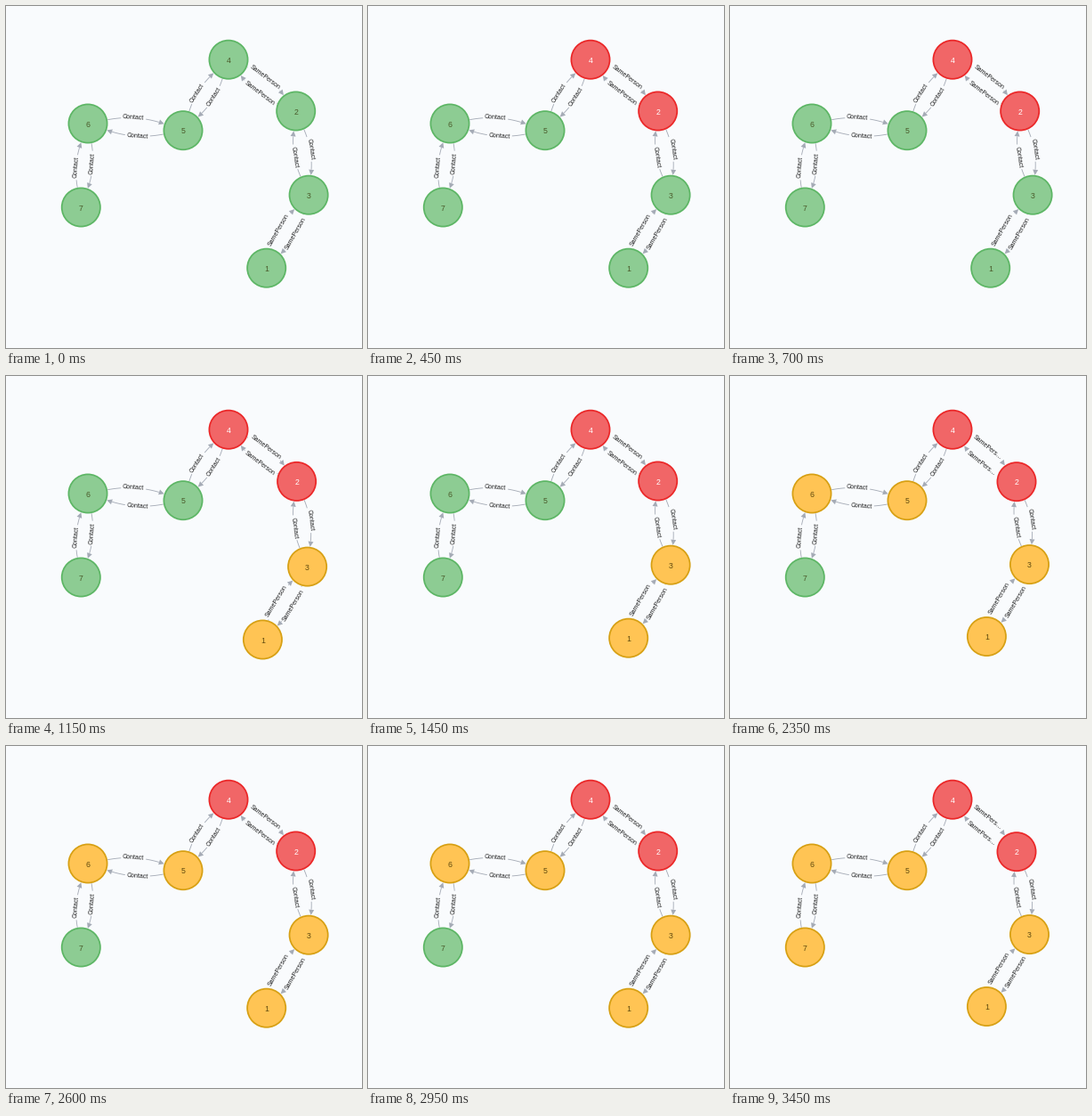
Animation, 400 px wide and 384 px high, one loop 3550 ms. Source, as a matplotlib script:

```python
import matplotlib.pyplot as plt
import numpy as np
from matplotlib.animation import FuncAnimation
from matplotlib.patches import Circle, Polygon

W, H, DPI = 400, 384, 100
LOOP, TICK = 3550, 50
STEP_MS = 82.56            # the layout refreshes at about 12 steps a second
PT = 72 / DPI              # points per pixel

RADIUS, RING = 21.6, 1.75
EDGE_RADIUS = 22.5
DEFLECTION = np.radians(15)
HEAD = 6.0
GREY = "#A5ABB6"
FONT = "Liberation Sans"

GREEN = ("#8DCC93", "#5DB665", "#4A5A2A")
RED = ("#F16667", "#EB2728", "#FFFFFF")
YELLOW = ("#FFC454", "#D7A013", "#604A0E")

HOME = {1: (292.7, 294.2), 2: (325.7, 118), 3: (340.1, 212.2), 4: (250, 60.2),
        5: (199, 139.7), 6: (92, 132), 7: (84.3, 226)}
LINKS = [(4, 2, "SamePerson"), (3, 1, "SamePerson"), (2, 3, "Contact"),
         (5, 4, "Contact"), (6, 5, "Contact"), (6, 7, "Contact")]
LABEL_WIDTH = {"Contact": 24.1, "SamePerson": 40.5, "SamePers…": 39.7}

# Step at which each node takes its new colour.
RECOLOUR = {4: (1, RED), 2: (1, RED), 3: (14, YELLOW), 1: (14, YELLOW),
            5: (28, YELLOW), 6: (28, YELLOW), 7: (42, YELLOW)}

# Offsets of the swinging nodes 2, 3 and 1.
REST = ((0, 0), (0, 0), (0, 0))
DIP = ((0.9, 0.4), (-1.5, 1.9), (-4.3, 1.8))
LEFT = ((-3.7, 0.7), (-3.6, -0.6), (-4.3, -1.7))
RIGHT = ((2, 0), (4.4, 0.8), (4.2, 2.8))
SWING = [(0, REST), (1, DIP), (2, LEFT), (5, REST), (11, REST), (13, RIGHT),
         (14, DIP), (15, LEFT), (18, REST), (25, REST), (27, RIGHT),
         (28, DIP), (29, LEFT), (32, REST), (39, REST), (41, RIGHT), (42, LEFT)]
SWING_STEPS = [step for step, _ in SWING]
SWING_POSES = np.array([pose for _, pose in SWING], float)

STEP_TICKS = np.floor(np.arange(43) * STEP_MS / TICK)

fig = plt.figure(figsize=(W / DPI, H / DPI), dpi=DPI, facecolor="#F9FBFD")
ax = fig.add_axes([0, 0, 1, 1])


def positions(step):
    nodes = {name: np.array(xy, float) for name, xy in HOME.items()}
    for row, name in enumerate((2, 3, 1)):
        for axis in (0, 1):
            nodes[name][axis] += np.interp(step, SWING_STEPS,
                                           SWING_POSES[:, row, axis])
    return nodes


def draw_arrow(a, b, label):
    """Arc from a to b, bulging to the left of travel, with a label in a gap."""
    dist = np.hypot(*(b - a))
    along = (b - a) / dist
    side = np.array([along[1], -along[0]])
    reach, lift = EDGE_RADIUS * np.cos(DEFLECTION), EDGE_RADIUS * np.sin(DEFLECTION)
    start = a + along * reach + side * lift
    end = b - along * reach + side * lift
    chord = dist - 2 * reach
    control = (start + end) / 2 + side * chord / 2 * np.tan(DEFLECTION)

    def point(t):
        t = np.atleast_1d(t)[:, None]
        return (1 - t) ** 2 * start + 2 * t * (1 - t) * control + t ** 2 * end

    shaft = 1 - HEAD / chord
    if label == "SamePerson" and chord - HEAD < LABEL_WIDTH[label] + 3.8:
        label = "SamePers…"
    gap = (LABEL_WIDTH[label] / 2 + 2) / chord
    for t0, t1 in ((0, shaft / 2 - gap), (shaft / 2 + gap, shaft)):
        if t1 > t0:
            ax.plot(*point(np.linspace(t0, t1, 12)).T, color=GREY,
                    lw=0.87 * PT, solid_capstyle="butt")

    heading = (end - control) / np.hypot(*(end - control))
    across = np.array([heading[1], -heading[0]]) * HEAD / 2
    base = end - heading * HEAD
    ax.add_patch(Polygon([end, base + across, base - across], fc=GREY, lw=0))

    angle = -np.degrees(np.arctan2(along[1], along[0]))
    angle = (angle + 90) % 180 - 90
    x, y = point(shaft / 2)[0]
    ax.text(x, y, label, fontsize=7 * PT, family=FONT, color="#1C1C1C",
            rotation=angle, rotation_mode="anchor", ha="center", va="center")


def draw_node(name, xy, step):
    when, changed = RECOLOUR[name]
    fill, ring, ink = changed if step >= when else GREEN
    ax.add_patch(Circle(xy, RADIUS, fc=fill, ec=ring, lw=RING * PT, zorder=3))
    ax.text(xy[0], xy[1] + 1.2, str(name), fontsize=8.8 * PT, family=FONT,
            color=ink, ha="center", va="center", zorder=4)


def draw(tick):
    step = np.searchsorted(STEP_TICKS, tick, side="right") - 1
    ax.clear()
    ax.set(xlim=(0, W), ylim=(H, 0))
    ax.axis("off")
    nodes = positions(step)
    for a, b, label in LINKS:
        draw_arrow(nodes[a], nodes[b], label)
        draw_arrow(nodes[b], nodes[a], label)
    for name, xy in nodes.items():
        draw_node(name, xy, step)
    return []


anim = FuncAnimation(fig, draw, frames=LOOP // TICK, interval=TICK,
                     init_func=lambda: [], repeat=True, repeat_delay=0)
plt.show()
```
